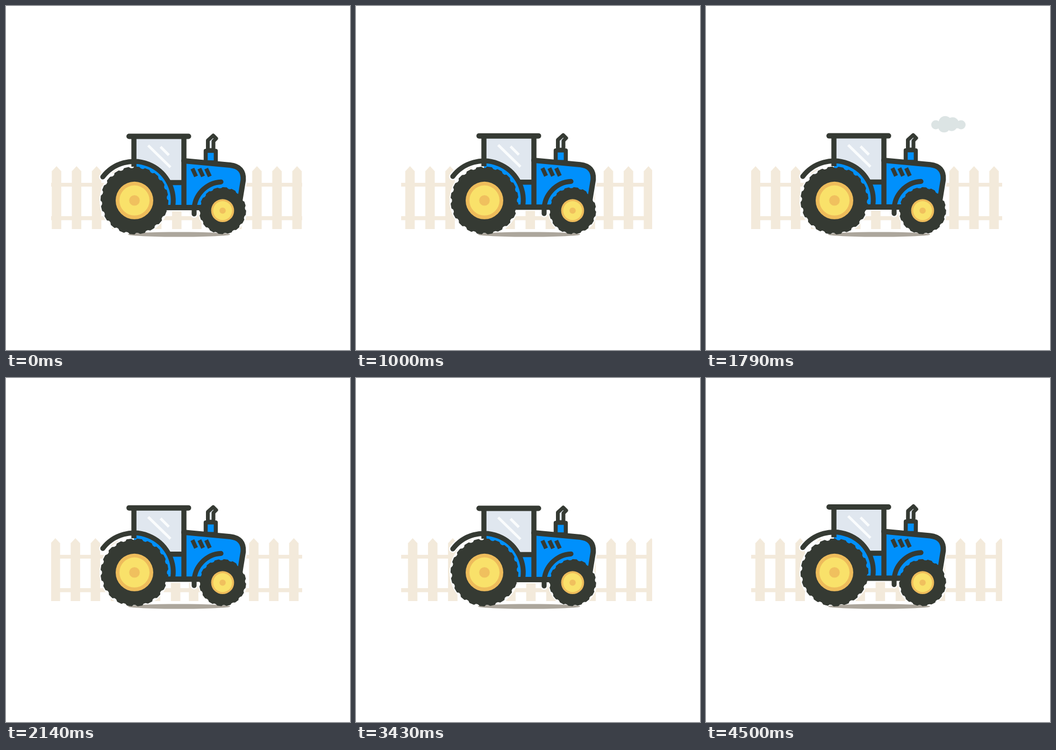
These frames come from a looping animation (640 px wide and 640 px high, 4570 ms). An HTML page with a canvas:

```html
<!DOCTYPE html>
<html lang="en">
<head>
<meta charset="utf-8">
<title>Tractor</title>
<style>
html, body { margin: 0; width: 100%; height: 100%; overflow: hidden; background: #fff; }
canvas { display: block; width: 640px; height: 640px; }
</style>
</head>
<body>
<canvas id="stage" width="640" height="640"></canvas>
<script>
const ctx = document.getElementById('stage').getContext('2d');
const TAU = Math.PI * 2;
const LOOP = 4570, STEPS = 64;
const DARK = '#353a33', BLUE = '#0090fc', GLASS = '#e0e7ef', WOOD = '#f3eadb';
const clamp = v => Math.max(0, Math.min(1, v));
const mix = (a, b, p) => a + (b - a) * p;

function disc(x, y, r, color) {
  ctx.fillStyle = color;
  ctx.beginPath();
  ctx.arc(x, y, r, 0, TAU);
  ctx.fill();
}

function stroke(path, width, color, cap = 'round') {
  ctx.lineWidth = width;
  ctx.strokeStyle = color;
  ctx.lineCap = cap;
  ctx.lineJoin = 'round';
  ctx.stroke(path);
}

function fill(path, color) {
  ctx.fillStyle = color;
  ctx.fill(path);
}

const P = d => new Path2D(d);
const roof = P('M229 242.5H339.5');
const posts = P('M238 243V299M331 243V375M303 328.5H331');
const chassis = P('M296 375H364');
const hood = P('M331 288L417 296Q443 299 441.3 324L433.5 372');
const hoodFill = P('M331 288L417 296Q443 299 441.3 324L433.5 375H300V329H331Z');
const rearPanel = P('M238 363V290A73 73 0 0 1 311 363V372H238Z');
const rearFender = P('M180 318A73 73 0 0 1 310.6 371');
const frontFender = P('M400 327.3A53 53 0 0 0 350 380V387');
const vents = P('M346.8 302.5L353.6 317M359.8 302.5L366.6 317M372.4 302.5L379.2 317');
const shine = P('M264.5 259.5L306 300M287.5 262L303 277.5');
const pipe = P('M375.5 268V250L385.5 241L391 246.5L386 251.5V268Z');
const pipeBase = P('M371.5 269.5H390.3V291H371.5Z');

function drawFence(n) {
  const pitch = 37.29, span = 481, left = 85.2 - n * 7.53;
  ctx.save();
  ctx.beginPath();
  ctx.rect(84, 290, 467, 130);
  ctx.clip();
  ctx.fillStyle = WOOD;
  ctx.fillRect(84, 329, 467, 7);
  ctx.fillRect(84, 391, 467, 7.5);
  for (let run = 0; run < 2; run++) {
    for (let i = 0; i < 13; i++) {
      const x = left + run * span + i * pitch;
      ctx.beginPath();
      ctx.moveTo(x, 415);
      ctx.lineTo(x, 307.5);
      ctx.lineTo(x + 8.8, 298);
      ctx.lineTo(x + 17.6, 307.5);
      ctx.lineTo(x + 17.6, 415);
      ctx.fill();
    }
  }
  ctx.restore();
}

// Hop with a small rebound, eight per loop
function lift(n) {
  const p = (n % 8) / 8;
  if (p < 0.5) return 3 * (1 - Math.cos(TAU * p));
  if (p < 0.77) return 6 * (1 - ((p - 0.5) / 0.27) ** 2);
  const u = (p - 0.77) / 0.23;
  return 10 * u * (1 - u);
}

function drawExhaust(up) {
  ctx.save();
  ctx.translate(381, 290);
  ctx.rotate((up / 6) ** 3 * 0.1);
  ctx.translate(-381, -290);
  fill(pipe, GLASS);
  stroke(pipe, 7, DARK);
  fill(pipeBase, BLUE);
  stroke(pipeBase, 7.5, DARK);
  ctx.restore();
}

function drawBody(up) {
  ctx.save();
  ctx.translate(0, -up);
  for (const line of [rearFender, frontFender, chassis, hood]) stroke(line, 14, '#fff');
  drawExhaust(up);
  ctx.fillStyle = GLASS;
  ctx.fillRect(240, 243, 90, 86);
  stroke(shine, 5, '#fafcfd', 'butt');
  fill(hoodFill, BLUE);
  fill(rearPanel, BLUE);
  stroke(hood, 10, DARK);
  stroke(chassis, 10, DARK);
  stroke(posts, 9.5, DARK, 'butt');
  stroke(roof, 10, DARK);
  stroke(vents, 7.6, DARK, 'butt');
  stroke(rearFender, 9.2, DARK);
  stroke(frontFender, 9.2, DARK);
  ctx.restore();
}

function drawWheel(x, y, r, teeth, angle, rim, face, cap) {
  const dent = r * 0.043, slot = TAU / teeth;
  ctx.beginPath();
  for (let i = 0; i < teeth; i++) {
    const a = angle + i * slot;
    for (const [at, d] of [[0, 0], [0.45, 0], [0.65, dent], [0.85, dent]]) {
      ctx.lineTo(x + Math.cos(a + at * slot) * (r - d), y + Math.sin(a + at * slot) * (r - d));
    }
  }
  ctx.closePath();
  ctx.fillStyle = DARK;
  ctx.fill();
  disc(x, y, rim, '#eebc5b');
  disc(x, y, face, '#f9e16a');
  disc(x, y, cap, '#f0c05e');
}

function drawPuff(age) {
  if (age < 6.3 || age > 12.3) return;
  const grow = 1 - (1 - clamp((age - 6.3) / 1.7)) ** 2;
  const rise = Math.max(0, age - 9);
  ctx.save();
  ctx.translate(mix(393, 463, grow) - rise * 15, mix(243, 228, grow) - rise * 9.33);
  ctx.scale(grow, grow);
  ctx.globalAlpha = 1 - (rise / 3.35) ** 1.5;
  ctx.fillStyle = '#d8e1e1';
  ctx.beginPath();
  const lobes = [[-23.5, 0.5, 8.5], [-6, -3.5, 12.3], [8, -2, 11.5], [23.5, 0.5, 8.5], [-8, 3.5, 11.3], [6, 2, 10.3]];
  for (const [x, y, r] of lobes) {
    ctx.moveTo(x + r, y);
    ctx.arc(x, y, r, 0, TAU);
  }
  ctx.rect(-23, -6, 46, 13);
  ctx.fill();
  ctx.restore();
}

function draw(now) {
  // The motion runs at fourteen poses a second
  const n = Math.min(STEPS - 1, Math.floor((now % LOOP + 5) * STEPS / LOOP));
  const turn = n / STEPS * TAU;
  ctx.fillStyle = '#fff';
  ctx.fillRect(0, 0, 640, 640);
  drawFence(n);
  disc(239, 361.8, 65, '#fff');
  disc(403, 380.7, 45.5, '#fff');
  ctx.fillStyle = '#aca69c';
  ctx.beginPath();
  ctx.ellipse(322, 425, 95, 4.6, 0, 0, TAU);
  ctx.fill();
  for (let k = 0; k < 4; k++) drawPuff(n - k * 15.2);
  drawBody(lift(n));
  drawWheel(239, 361.8, 63.2, 20, turn * 1.2, 35, 28, 9.8);
  drawWheel(403, 380.7, 43.8, 16, turn * 1.75, 21.4, 17.6, 5.8);
}

const start = performance.now();
function tick() {
  draw(performance.now() - start);
  requestAnimationFrame(tick);
}
tick();
</script>
</body>
</html>
```
